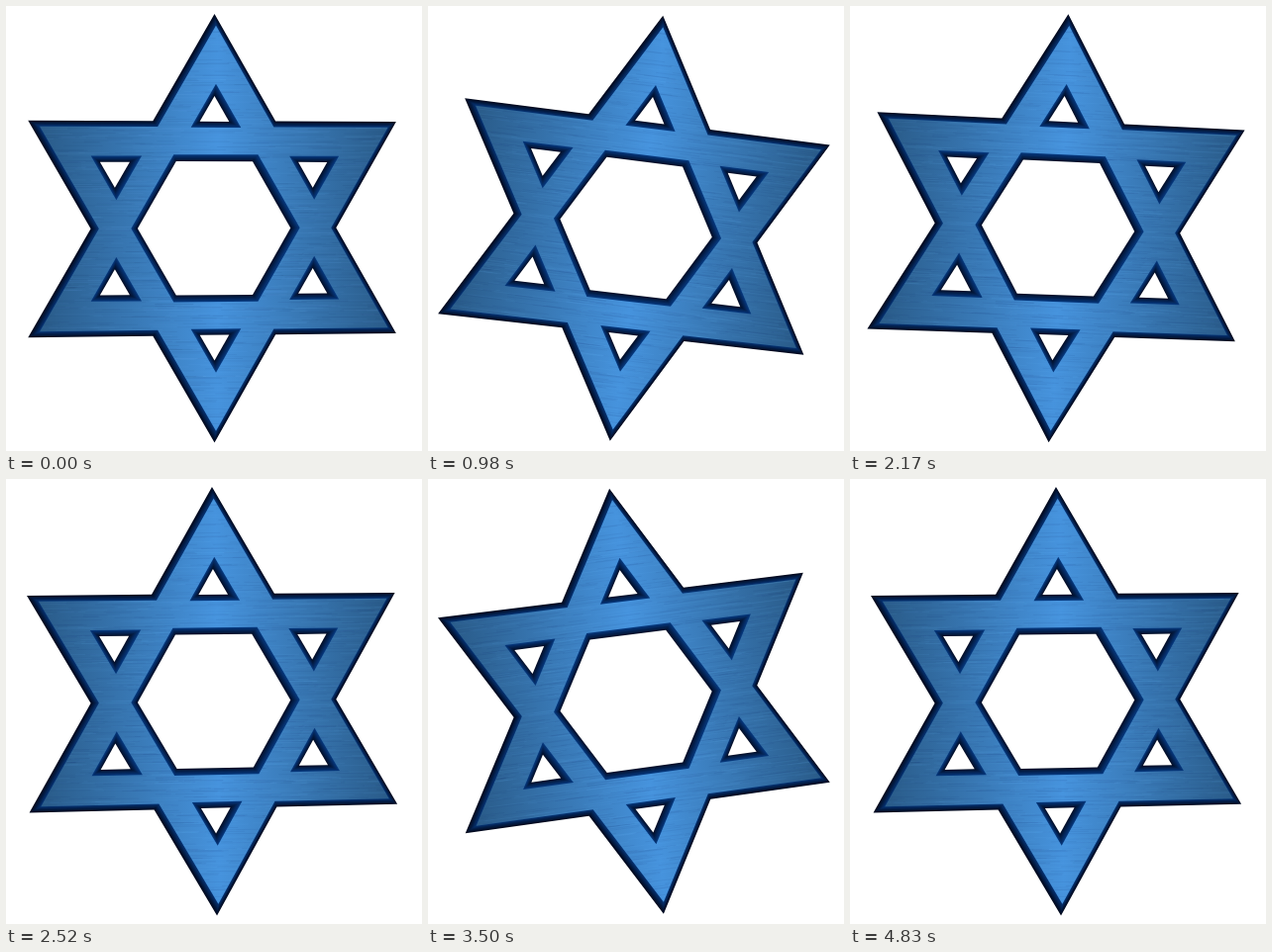
An HTML page with a canvas that plays this animation: 420x450 px, repeating every 4.9 s.

```html
<!DOCTYPE html>
<html lang="en">
<head>
<meta charset="utf-8">
<title>Swinging star</title>
<style>
  html, body { margin: 0; width: 100%; height: 100%; overflow: hidden; background: #fff; }
  canvas { display: block; }
</style>
</head>
<body>
<canvas id="stage" width="420" height="450"></canvas>
<script>
const ctx = document.getElementById('stage').getContext('2d');
const STEP = 70, STEPS = 70, SWING = 7.45 * Math.PI / 180;
const CX = 210.5, CY = 224.7;
const LAYERS = 8, FRONT_SHIFT = 1.5;
const ARM_DISTANCE = 116.5;
const DARK = [1, 9, 30], BLUE = [6, 54, 122];
const EDGE = [40, 88, 132], SHINE = [70, 147, 221];

const lerp = (a, b, t) => a + (b - a) * t;
const mix = (from, to, t) => `rgb(${from.map((v, i) => Math.round(lerp(v, to[i], t)))})`;
const polar = (radius, angle) => [radius * Math.cos(angle), radius * Math.sin(angle)];
const armAngle = i => -Math.PI / 2 + i * Math.PI / 3;

// The star is seen slightly from its left; depth runs from 0 (back) to 1 (front).
function project([x, y], depth) {
  const scale = 1 - x * 7e-5;
  return [
    CX + x * 0.99 * scale + FRONT_SHIFT * depth,
    CY + y * scale - x * 0.004
  ];
}

function outline(points, depth) {
  const path = new Path2D();
  points.forEach(point => path.lineTo(...project(point, depth)));
  path.closePath();
  return path;
}

function regular(sides, radius, angle, [x, y] = [0, 0]) {
  return Array.from({ length: sides }, (_, i) => {
    const [dx, dy] = polar(radius, angle + i * 2 * Math.PI / sides);
    return [x + dx, y + dy];
  });
}

function hexagram(radius) {
  return Array.from({ length: 12 }, (_, i) =>
    polar(i % 2 ? radius / Math.sqrt(3) : radius, armAngle(i / 2)));
}

// Each shape gives its outline at a depth.
const star = depth => outline(hexagram(lerp(216.7, 205, depth)), depth);
const hexagon = depth => outline(regular(6, lerp(78, 86, depth), 0), depth);
const triangle = arm => depth => {
  const angle = armAngle(arm);
  return outline(regular(3, lerp(17.3, 29.5, depth), angle, polar(ARM_DISTANCE, angle)), depth);
};
const holes = [hexagon, ...Array.from({ length: 6 }, (_, arm) => triangle(arm))];

// Nested slices of a shape, dark at the back and blue at the front.
function bevel(shape) {
  return Array.from({ length: LAYERS }, (_, i) => {
    const depth = i / (LAYERS - 1);
    return { path: shape(depth), color: mix(DARK, BLUE, depth) };
  });
}

let seed = 7;
function random() {
  seed = (seed * 16807) % 2147483647;
  return seed / 2147483647;
}

function brushedLines(count) {
  const path = new Path2D();
  for (let i = 0; i < count; i++) {
    const x = random() * 420, y = random() * 450;
    path.moveTo(x, y);
    path.lineTo(x + 10 + random() * 50, y);
  }
  return path;
}

const metal = ctx.createLinearGradient(25, 0, 395, 0);
[0, 0.51, 1].forEach((at, i) => metal.addColorStop(at, mix(EDGE, SHINE, i % 2)));

const rim = bevel(star);
const face = star(1);
const wells = holes.map(hole => ({ slices: bevel(hole).reverse(), gap: hole(0) }));
const grain = [
  { color: 'rgba(120,185,245,.08)', path: brushedLines(1300) },
  { color: 'rgba(5,40,95,.08)', path: brushedLines(1300) }
];

function fill(path, color) {
  ctx.fillStyle = color;
  ctx.fill(path);
}

function drawStar() {
  rim.forEach(({ path, color }) => fill(path, color));
  fill(face, metal);

  ctx.save();
  ctx.clip(face);
  ctx.lineWidth = 0.8;
  for (const { path, color } of grain) {
    ctx.strokeStyle = color;
    ctx.stroke(path);
  }
  ctx.restore();

  for (const { slices, gap } of wells) {
    slices.forEach(({ path, color }) => fill(path, color));
    fill(gap, '#fff');
  }
}

function draw(now) {
  const step = Math.floor(now / STEP) % STEPS;
  ctx.setTransform(1, 0, 0, 1, 0, 0);
  ctx.fillStyle = '#fff';
  ctx.fillRect(0, 0, 420, 450);
  ctx.translate(CX, CY);
  ctx.rotate(SWING * Math.sin(2 * Math.PI * step / STEPS));
  ctx.translate(-CX, -CY);
  drawStar();
}

let start;
function tick(now) {
  start ??= now;
  draw(Math.max(0, now - start));
  requestAnimationFrame(tick);
}
draw(0);
requestAnimationFrame(tick);
</script>
</body>
</html>
```
